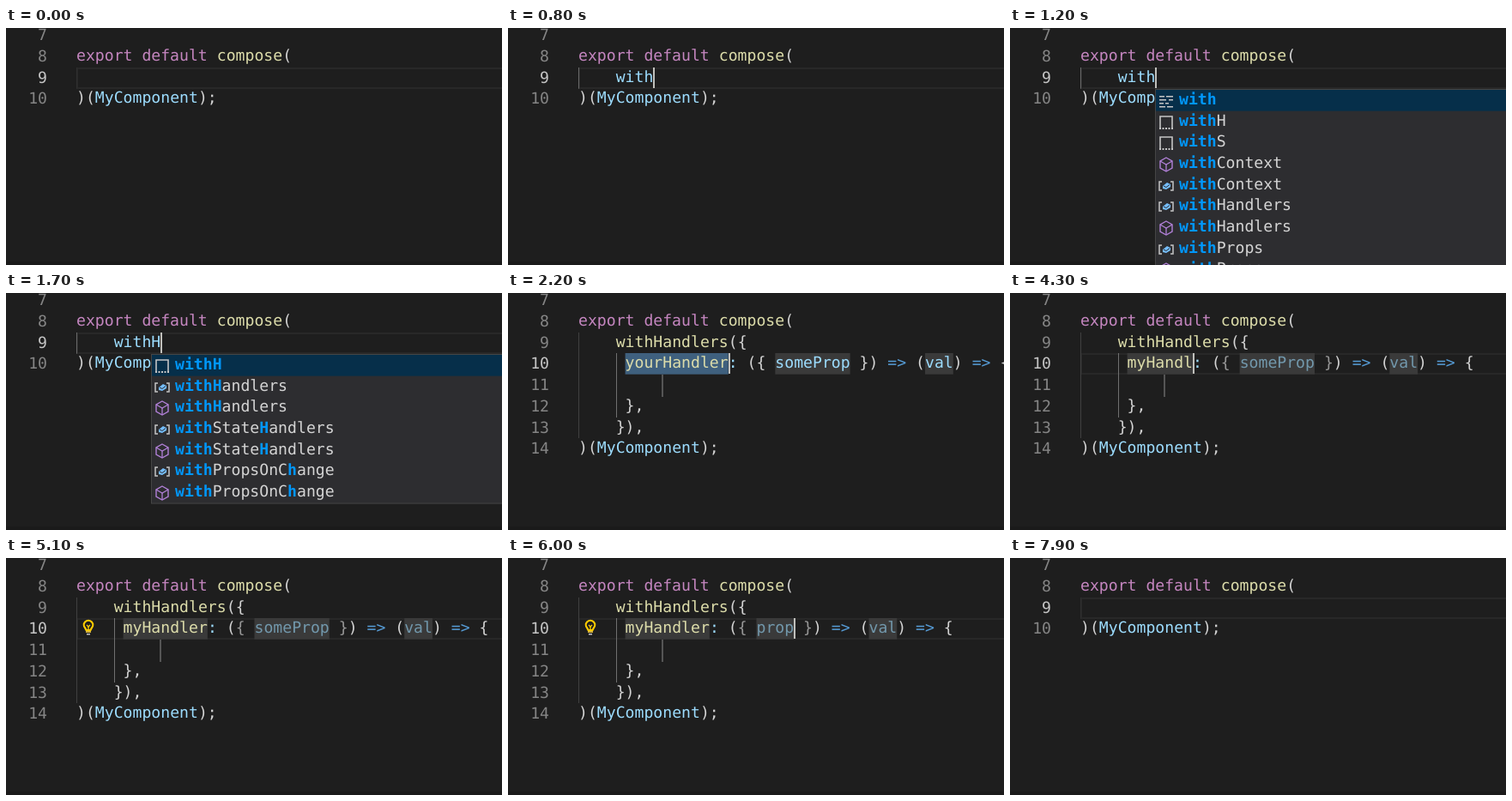
Write an HTML page with a canvas that moves like this. It is 578x276 px and loops after 8 s.

```html
<!DOCTYPE html>
<html lang="en">
<head>
<meta charset="utf-8">
<title>Snippet typing</title>
<style>
  html, body { margin: 0; width: 100%; height: 100%; overflow: hidden; background: #1e1e1e; }
  canvas { display: block; width: 578px; height: 276px; }
</style>
</head>
<body>
<canvas></canvas>
<script>
const W = 578, H = 276, LOOP = 8000;
const LEFT = 82, CHAR = 10.92, ROW = 24.7, TOP = 21;
const FONT = '18.14px "DejaVu Sans Mono", monospace';
const C = {
  bg: '#1e1e1e', text: '#d4d4d4', keyword: '#c586c0', func: '#dcdcaa',
  name: '#9cdcfe', arrow: '#569cd6', number: '#858585', active: '#c6c6c6',
  dimName: '#7298ac', dimText: '#989898', holder: '#3a3a3a', held: '#3f607e',
  select: '#264f78', match: '#0097fb', icon: '#c5c5c5'
};

const canvas = document.querySelector('canvas');
const ctx = canvas.getContext('2d');
const scale = window.devicePixelRatio || 1;
canvas.width = W * scale;
canvas.height = H * scale;

const colX = col => LEFT + col * CHAR;
const rowY = row => Math.round(TOP + row * ROW);

function box(x, y, w, h, color) {
  ctx.fillStyle = color;
  ctx.fillRect(x, y, w, h);
}

function write(str, x, y, color, bold) {
  ctx.font = (bold ? 'bold ' : '') + FONT;
  ctx.fillStyle = color;
  ctx.fillText(str, x, y);
}

function path(points, color, width = 1.3, close = false) {
  ctx.beginPath();
  points.forEach(([x, y]) => ctx.lineTo(x, y));
  if (close) ctx.closePath();
  ctx.strokeStyle = color;
  ctx.lineWidth = width;
  ctx.stroke();
}

// Tokens are [text, color, background?]
function codeLine(row, col, tokens) {
  for (const [str, color, back] of tokens) {
    if (back) box(colX(col), rowY(row), str.length * CHAR, ROW, back);
    write(str, colX(col), rowY(row) + 17, color);
    col += str.length;
  }
}

// Keystroke times for each typed word
const KEYS = {
  with: [300, 500, 600, 800, 1600],
  handler: [2900, 3700, 3800, 3900, 4000, 4100, 4300, 4400, 4500],
  prop: [5400, 5500, 5600, 5700]
};
const POPUP = 900, ACCEPT = 1900, TAB_PROP = 5200, TAB_VAL = 6400,
      SELECT_ALL = 7400, CLEAR = 7800;
const EVENTS = [...KEYS.with, ACCEPT, ...KEYS.handler, TAB_PROP, ...KEYS.prop, TAB_VAL];

const between = (t, a, b) => t >= a && t < b;
const typed = (word, times, t) => word.slice(0, times.filter(k => k <= t).length);

function cursor(t, row, col) {
  const last = EVENTS.filter(k => k <= t).pop();
  if (last === undefined || Math.floor((t - last) / 500) % 2) return;
  box(Math.round(colX(col)), rowY(row), 2, 24, '#c0c0bc');
}

function lineFrame(row) {
  ctx.strokeStyle = '#282828';
  ctx.lineWidth = 2;
  ctx.strokeRect(LEFT + 1, rowY(row) + 1, W - LEFT + 4, 23);
}

function lineNumbers(count, active) {
  for (let row = -1; row < count; row++) {
    const label = String(row + 8);
    write(label, 48 - label.length * CHAR, rowY(row) + 18, row === active ? C.active : C.number);
  }
}

function lastLine(row) {
  codeLine(row, 0, [[')(', C.text], ['MyComponent', C.name], [');', C.text]]);
}

function wordIcon(x, y) {
  [[-8, -5, 6], [0, -5, 8], [-8, -1, 8], [3, -1, 5], [-8, 3, 5], [-1, 3, 4], [-8, 7, 7], [1, 7, 7]]
    .forEach(([dx, dy, w]) => box(x + dx, y + dy - 1, w, 1.5, C.icon));
}

function snippetIcon(x, y) {
  path([[x - 7, y + 6], [x - 7, y - 7], [x + 7, y - 7], [x + 7, y + 6]], C.icon, 1.6);
  for (let i = -7; i <= 7; i += 3.5) box(x + i - 1, y + 6, 2, 2, C.icon);
}

function cubeIcon(x, y) {
  const color = '#b180d7';
  path([[x, y - 8], [x + 7, y - 4], [x + 7, y + 4], [x, y + 8], [x - 7, y + 4], [x - 7, y - 4]], color, 1.4, true);
  path([[x - 7, y - 4], [x, y], [x + 7, y - 4]], color);
  path([[x, y], [x, y + 8]], color);
}

function variableIcon(x, y) {
  for (const s of [-1, 1]) {
    path([[x + s * 5, y - 5], [x + s * 8, y - 5], [x + s * 8, y + 5], [x + s * 5, y + 5]], C.icon, 1.5);
  }
  ctx.beginPath();
  [[-4, 0], [1, -4], [5, -2], [5, 1], [0, 4], [-4, 3]].forEach(([dx, dy]) => ctx.lineTo(x + dx, y + dy));
  ctx.fillStyle = '#75beff';
  ctx.fill();
  path([[x - 3, y], [x, y + 1.5], [x + 4, y - 1.5]], '#2d2d30', 1);
}

const pair = label => [[label, cubeIcon], [label, variableIcon]];
const WITH_ITEMS = [
  ['with', wordIcon], ['withH', snippetIcon], ['withS', snippetIcon],
  ...pair('withContext'), ...pair('withHandlers').reverse(), ...pair('withProps').reverse()
];
const WITH_H_ITEMS = [
  ['withH', snippetIcon], ...pair('withHandlers').reverse(),
  ...pair('withStateHandlers').reverse(), ...pair('withPropsOnChange').reverse()
];

function popup(items, matchH) {
  const x = 169, y = 71, step = 24.65;
  box(x, y, W - x, items.length * step + 2, '#454545');
  box(x + 1, y + 1, W - x, items.length * step, '#2d2d30');
  items.forEach(([label, icon], i) => {
    const top = y + 1 + i * step;
    if (!i) box(x + 1, top, W - x, step, '#062f4a');
    icon(182, Math.round(top + 13));
    const hit = matchH ? label.slice(4).search(/h/i) + 4 : -1;
    const base = Math.round(top + 17);
    write('with', 197, base, C.match, true);
    [...label.slice(4)].forEach((ch, n) => {
      const on = n + 4 === hit;
      write(ch, 197 + (n + 4) * CHAR, base, on ? C.match : C.text, on);
    });
  });
}

function bulb(x, y) {
  ctx.beginPath();
  ctx.arc(x, y - 2, 5.2, Math.PI * 0.75, Math.PI * 2.25);
  ctx.lineTo(x + 2.5, y + 4);
  ctx.lineTo(x - 2.5, y + 4);
  ctx.closePath();
  ctx.strokeStyle = '#ffcc00';
  ctx.lineWidth = 2.2;
  ctx.stroke();
  path([[x - 2, y - 2], [x, y], [x + 2, y - 2]], '#ffcc00', 1.3);
  path([[x, y], [x, y + 4]], '#ffcc00', 1.3);
  box(x - 3, y + 5, 6, 2, '#d0b040');
  box(x - 2, y + 8, 4, 1.5, '#c5c5c5');
}

function drawTyping(t) {
  const word = t < CLEAR ? typed('withH', KEYS.with, t) : '';
  lineNumbers(3, 1);
  lineFrame(1);
  box(LEFT, rowY(1), 1, ROW, word ? '#6a6a6a' : '#303030');
  codeLine(1, 4, [[word, C.name]]);
  lastLine(2);
  if (word) cursor(t, 1, 4 + word.length);
  if (between(t, POPUP, ACCEPT)) {
    const narrowed = word.length === 5;
    popup(narrowed ? WITH_H_ITEMS : WITH_ITEMS, narrowed);
  }
}

function drawSnippet(t) {
  const handler = typed('myHandler', KEYS.handler, t) || 'yourHandler';
  const prop = typed('prop', KEYS.prop, t) || 'someProp';
  const all = t >= SELECT_ALL;
  const onVal = t >= TAB_VAL;
  const onProp = !onVal && t >= TAB_PROP;
  const holding = t < KEYS.handler[0] || between(t, TAB_PROP, KEYS.prop[0]) || onVal;
  const dim = t >= 2600;
  const name = dim ? C.dimName : C.name;
  const brace = dim ? C.dimText : C.text;
  const back = on => all ? C.held : on && holding ? C.held : C.holder;

  lineNumbers(7, all ? 1 : 2);
  if (!holding) lineFrame(2);

  const propCol = 5 + handler.length + 5;
  const valCol = propCol + prop.length + 8;
  if (all) {
    [[1, 18], [2, valCol + 10], [3, 10], [4, 8], [5, 7]]
      .forEach(([row, end]) => box(LEFT, rowY(row), end * CHAR, ROW + 1, C.select));
  }

  box(LEFT, rowY(1), 1, rowY(6) - rowY(1), '#404040');
  box(126, rowY(2), 1, rowY(5) - rowY(2), '#707070');
  box(179, rowY(3), 2, 26, '#555555');

  codeLine(1, 4, [['withHandlers', C.func], ['({', C.text]]);
  codeLine(2, 5, [
    [handler, C.func, back(!onProp && !onVal)], [':', C.name], [' (', C.text],
    ['{ ', brace], [prop, name, back(onProp)], [' }', brace], [') ', C.text],
    ['=>', C.arrow], [' (', C.text], ['val', name, back(onVal)], [') ', C.text],
    ['=>', C.arrow], [' {', C.text]
  ]);
  codeLine(4, 5, [['},', C.text]]);
  codeLine(5, 4, [['}),', C.text]]);
  lastLine(6);

  if (!all) {
    cursor(t, 2, onVal ? valCol + 3 : onProp ? propCol + prop.length : 5 + handler.length);
  }
  if (between(t, 2600, 3600) || between(t, 4900, 5400) || between(t, 5800, SELECT_ALL)) bulb(96, 80);
}

function draw(t) {
  ctx.setTransform(scale, 0, 0, scale, 0, 0);
  ctx.textRendering = 'geometricPrecision';
  box(0, 0, W, H, C.bg);
  box(0, 272, W, 4, '#1a1a1a');
  if (between(t, ACCEPT, CLEAR)) drawSnippet(t);
  else drawTyping(t);
  codeLine(0, 0, [['export default ', C.keyword], ['compose', C.func], ['(', C.text]]);
}

const start = performance.now();
function frame() {
  draw((performance.now() - start) % LOOP);
  requestAnimationFrame(frame);
}
draw(0);
requestAnimationFrame(frame);
</script>
</body>
</html>
```
